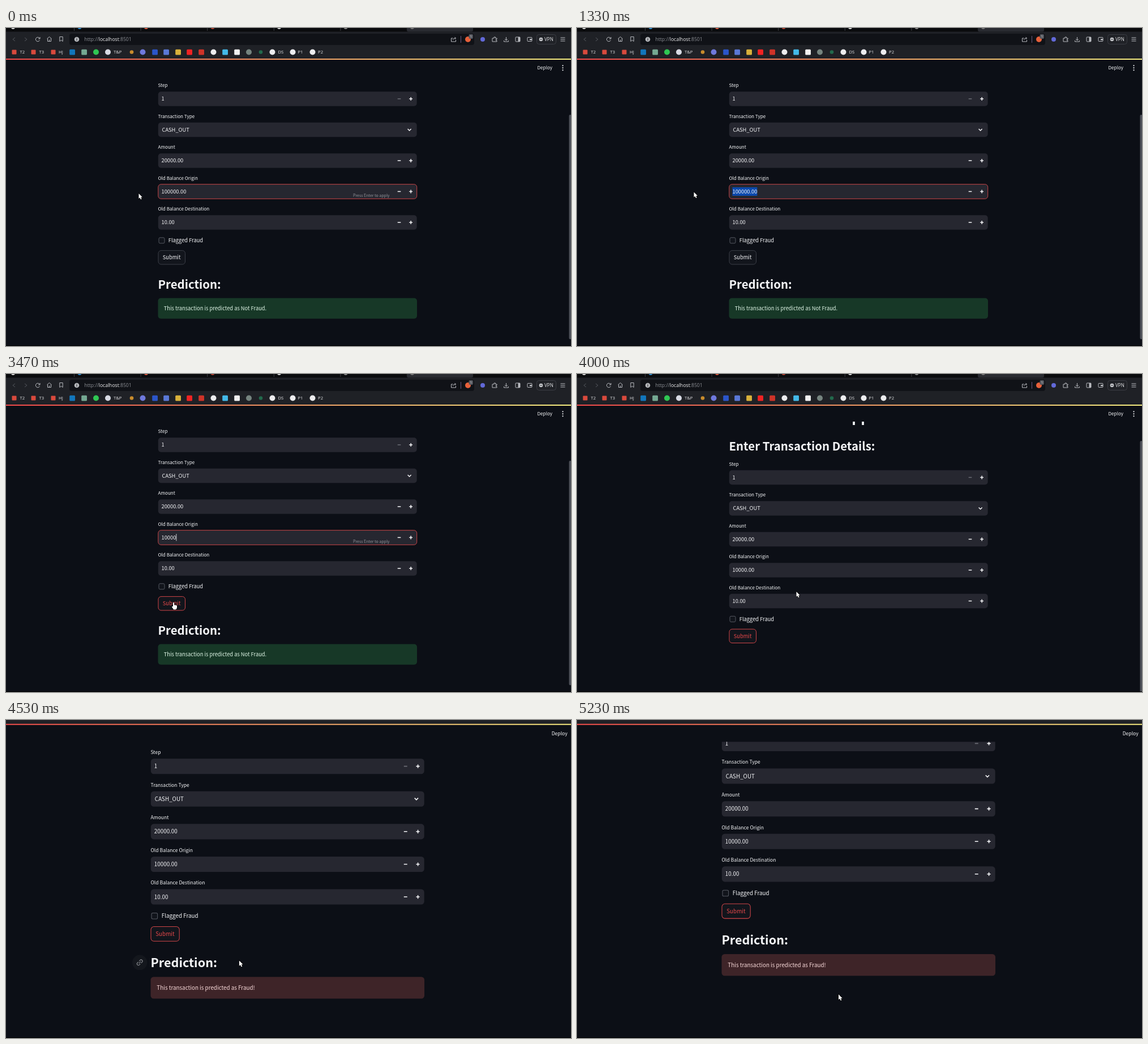
An HTML page with a canvas for the animation above (5260 ms loop, 998 px wide and 561 px high).

```html
<!DOCTYPE html>
<html lang="en">
<head>
<meta charset="utf-8">
<title>Transaction form demo</title>
<style>
  html, body { margin: 0; width: 100%; height: 100%; overflow: hidden; background: #0c0f16; }
  canvas { display: block; }
</style>
</head>
<body>
<canvas id="stage" width="998" height="561"></canvas>
<script>
const ctx = document.getElementById('stage').getContext('2d');
const LOOP = 5260, COMMIT = 3560, RESULT = 4220;
const PAGE_FONT = '"Noto Sans CJK JP","Noto Sans CJK SC","Noto Sans CJK","Open Sans",sans-serif';
const UI_FONT = '"Open Sans","Noto Sans",sans-serif';
const BG = '#0c0f16', FIELD = '#262730', WHITE = '#f6f7f9', RED = '#e8484a', BAR = '#1f2126', ICON = '#b9bbc0';
const LABEL = 8.14, BODY = 9.3, HEADING = 20.4;
const LEFT = 268.5, WIDTH = 457.5;

const clamp = v => Math.min(1, Math.max(0, v));
const smooth = v => v * v * (3 - 2 * v);

// Cursor path: time, x, y
const PATH = [
  [0, 234.5, 292], [200, 234.5, 292], [900, 206.5, 289.5], [2950, 206.5, 289.5],
  [3450, 296, 403], [3650, 296, 403], [4000, 387.5, 384], [4200, 308.7, 458.3],
  [4360, 308.7, 458.3], [4600, 443.5, 446.9], [5150, 463.9, 505.5], [LOOP, 463.9, 505.5]
];
// Time at which each typed digit of 10000 appears
const KEYS = [2200, 2350, 2480, 2620, 2850];

const ARROW = new Path2D('M0 0V9l2-1.8 1.5 3.3 1.6-.7L3.7 6.600H6.400Z');
const HAND = new Path2D('M-1 7V1a1 1 0 0 1 2 0V4.500q3.500 0 5 1.200V9q-.2 3-2 3.500H0L-3 8q-.2-1.500 2-1Z');

function cursorAt(t) {
  const i = Math.max(1, PATH.findIndex(p => p[0] > t));
  const [a, b] = [PATH[i - 1], PATH[i]];
  const p = smooth((t - a[0]) / (b[0] - a[0]));
  return [a[1] + (b[1] - a[1]) * p, a[2] + (b[2] - a[2]) * p];
}

// Text whose capitals are centred vertically on y
function text(str, x, y, size, color = WHITE, { font = PAGE_FONT, weight = 400, align = 'left' } = {}) {
  ctx.font = `${weight} ${size}px ${font}`;
  ctx.textAlign = align;
  ctx.fillStyle = color;
  ctx.fillText(str, x, y + size * .365);
}
const uiText = (str, x, y, size, color = '#e3e4e6') => text(str, x, y, size, color, { font: UI_FONT });

function rect(x, y, w, h, fill, r = 0, stroke) {
  ctx.beginPath();
  ctx.roundRect(x, y, w, h, r);
  if (fill) { ctx.fillStyle = fill; ctx.fill(); }
  if (stroke) { ctx.strokeStyle = stroke; ctx.lineWidth = 1; ctx.stroke(); }
}

function dot(x, y, r, color) {
  ctx.beginPath();
  ctx.arc(x, y, r, 0, 7);
  ctx.fillStyle = color;
  ctx.fill();
}

function line(d, x, y, color = ICON, width = 1) {
  ctx.save();
  ctx.translate(x, y);
  ctx.strokeStyle = color;
  ctx.lineWidth = width;
  ctx.stroke(new Path2D(d));
  ctx.restore();
}

function browser() {
  rect(-20, -2, 1040, 56, BAR);
  rect(-20, -2, 1040, 8.5, '#0a0b0d');
  rect(708, -5, 117, 11.5, '#292b31', 3);
  for (let i = 0; i < 7; i++) {
    dot(12.500 + i * 117.500, -1.500, 3.500, ['#ddd', '#2c8fd6', '#e2583e', '#b8402f', '#ddd', '#888', '#777'][i]);
    if (i < 5) rect(120 + i * 117.600, 0, 1, 5, '#3c3e44');
  }

  line('M3-3L-1 0L3 3', 13, 20, '#53565c');
  line('M-3-3L1 0L-3 3', 36, 20, '#53565c');
  line('M3.500-1.500A3.700 3.700 0 1 0 3.500 1.500M4-4V-1H1', 56, 20);
  line('M-4-.5L0-4L4-.5M-3-1V4H3V-1M0 4V1', 76.500, 19.500);
  line('M-2.700-4H2.700V4L0 2L-2.700 4Z', 97.500, 19.500);
  rect(112, 10, 715, 20, '#101217', 4);
  dot(125, 20, 4.300, '#b5b7bb');
  rect(124.500, 19.300, 1, 3, '#101217');
  rect(124.500, 17.400, 1, 1, '#101217');
  uiText('http://', 138.500, 20, 8.600, '#8d9096');
  const schemeWidth = ctx.measureText('http://').width;
  uiText('localhost', 138.500 + schemeWidth, 20, 8.600, '#f0f0f1');
  const hostWidth = ctx.measureText('localhost').width;
  uiText(':8501', 138.500 + schemeWidth + hostWidth, 20, 8.600, '#8d9096');
  line('M-1-2H-4V4H4V1M-1 1Q-1-2 4-2M2-4L4-2L2 0', 790.500, 20);
  rect(803, 14, 1, 12, '#67587e');
  dot(816, 20, 5, '#e7603a');
  rect(817.500, 11, 7.500, 8, '#55585f', 2);
  uiText('1', 819.500, 15, 6);
  dot(842, 20, 4, '#6269d8');
  line('M-4-2H-1V-4H1.500V-2H4V0H2.500V2H4V4H-4Z', 863, 20);
  line('M0-4V2M-2.500-.5L0 2L2.500-.5M-4 2V4H4V2', 883.500, 20);
  rect(900, 16, 8, 8, null, 1, ICON);
  rect(904.500, 16, 3.500, 8, ICON);
  rect(921, 16.500, 8, 7, null, 1, ICON);
  rect(925, 19, 4, 2.500, ICON);
  rect(937.500, 11.500, 34, 17, '#202227', 4, '#3b3d44');
  dot(945, 20, 3.300, '#c9cbcf');
  rect(943.200, 19.500, 3.600, 1, BAR);
  uiText('VPN', 951, 20, 8.100);
  line('M-4-3H4M0 0H0M-4 0H4M-4 3H4', 983.500, 20);

  for (const x of [14.500, 48.500, 83.500]) rect(x - 4, 38.500, 8, 8, '#d94a3d', 1);
  const squares = { 117: '#1276bb', 138: '#74a892', 263: '#2b55c8', 283: '#5a78d6', 304: '#d9b13a',
                    324: '#f02323', 345: '#cf3328', 387: '#43b9e8', 408: '#f1f1f1' };
  for (const x in squares) rect(x - 4.800, 37.700, 9.800, 9.800, squares[x], 1.500);
  const circles = { 159: '#2fc653', 180: '#d8dbe4', 222: '#c98c2c', 241.500: '#6f79dc', 366.500: '#ececee',
                    429: '#75847f', 450: '#226a4c', 470.500: '#ececee', 506.500: '#ececee', 541.500: '#ececee' };
  for (const x in circles) dot(+x, 42.500, +x === 222 || +x === 450 ? 3.300 : 5, circles[x]);
  const names = { 24.500: 'T2', 58.500: 'T3', 93: 'HJ', 190: 'T&P', 480.500: 'DS', 515.500: 'P1', 551: 'P2' };
  for (const x in names) uiText(names[x], +x, 42.500, 7.700);
}

function pageHeader(t) {
  const glow = ctx.createLinearGradient(0, 0, 998, 0);
  glow.addColorStop(0, '#f2494a');
  glow.addColorStop(1, '#f5ee80');
  rect(-20, 54, 1040, 2, glow);
  text('Deploy', 938.500, 70, LABEL);
  for (const y of [66.300, 70.300, 74.300]) dot(983.500, y, 1.100, WHITE);

  const busy = t < 4000 ? clamp((3900 - t) / 120) * (t > 3620) : clamp((4420 - t) / 130) * (t > RESULT);
  if (!busy) return;
  ctx.globalAlpha = busy;
  dot(834, 64.500, 1.400, '#5a5d63');
  line('M-5-3H5M0-3V2M-1.600-3V7M1.600-3V7', 834, 70, '#5a5d63', 1.600);
  text('RUNNING...', 848, 70, LABEL, '#54575e');
  text('Stop', 904.800, 70, LABEL, '#7c7f85');
  ctx.globalAlpha = 1;
}

function field(label, y, { value, focused, disabled, select } = {}) {
  text(label, LEFT, y - 23.500, LABEL);
  rect(LEFT + .3, y - 12.800, WIDTH - .6, 25.600, FIELD, 5, focused ? '#c94447' : null);
  text(value, select ? 275.500 : 274.500, y, BODY);
  if (select) return line('M-3-1.500L0 1.500L3-1.500', 712.600, y, WHITE, 1.500);
  rect(691.700, y - .8, 5.600, 1.500, disabled ? '#6c6e76' : WHITE);
  rect(712.200, y - .8, 5.800, 1.500, WHITE);
  rect(714.400, y - 2.900, 1.500, 5.800, WHITE);
}

function originField(t, y) {
  const typed = KEYS.filter(k => t >= k).length;
  const selected = t >= 1000 && !typed;
  const value = t >= COMMIT ? '10000.00' : typed ? '10000'.slice(0, typed) : '100000.00';
  const focused = t < COMMIT;
  field('Old Balance Origin', y, { value, focused });
  if (!focused) return;
  ctx.font = `400 ${BODY}px ${PAGE_FONT}`;
  const width = ctx.measureText(value).width;
  if (selected) {
    rect(274.500, y - 7.500, width, 15, '#0b49ad');
    text(value, 274.500, y, BODY);
  } else {
    text('Press Enter to apply', 677.500, y + 7, 6.970, '#92949b', { align: 'right' });
    if (typed) rect(274.700 + width, y - 6.500, .8, 12.500, WHITE);
  }
}

function prediction(t, y) {
  const fraud = t >= RESULT;
  if (t >= COMMIT && !fraud) return;
  const hover = clamp((t - 4480) / 60) * clamp((5000 - t) / 60);
  if (hover) {
    ctx.globalAlpha = hover;
    dot(250.300, y - .5, 12.500, '#16191f');
    ctx.save();
    ctx.translate(250.300, y - .5);
    ctx.rotate(-Math.PI / 4);
    line('M-1-2.300H-3.200A2.300 2.300 0 0 0-3.200 2.300H-1M1-2.300H3.200A2.300 2.300 0 0 1 3.200 2.300H1M-2.300 0H2.300', 0, 0, '#a5a7ac');
    ctx.restore();
    ctx.globalAlpha = 1;
  }
  text('Prediction:', LEFT, y, HEADING, WHITE, { weight: 600 });
  ctx.globalAlpha = fraud ? clamp((t - RESULT) / 125) : 1;
  rect(LEFT, y + 23.500, WIDTH, 36.200, fraud ? '#3e2428' : '#173827', 5);
  text(`This transaction is predicted as ${fraud ? 'Fraud!' : 'Not Fraud.'}`, 278.800, y + 41.700, BODY,
       fraud ? '#fbdcdc' : '#e2f8e9');
  ctx.globalAlpha = 1;
}

function page(t, hovering) {
  const scrolled = 95.600 * (1 - (1 - clamp((t - 4440) / 300)) ** 2.550);
  const y = (t < COMMIT ? 125 : 182.500) - scrolled;
  ctx.save();
  ctx.beginPath();
  ctx.rect(-20, 84, 1040, 600);
  ctx.clip();

  text('Fraud Detection App', LEFT, y - 107.300, 24.900, WHITE, { weight: 600 });
  text('Enter Transaction Details:', LEFT, y - 54.700, HEADING, WHITE, { weight: 600 });
  field('Step', y, { value: '1', disabled: true });
  field('Transaction Type', y + 54.500, { value: 'CASH_OUT', select: true });
  field('Amount', y + 109, { value: '20000.00' });
  originField(t, y + 163.500);
  field('Old Balance Destination', y + 218, { value: '10.00' });
  rect(270, y + 244.800, 10, 10, '#11141b', 2, '#555861');
  text('Flagged Fraud', 286.800, y + 250, BODY);
  const hot = hovering || t >= COMMIT;
  rect(269, y + 267.600, 47.500, 24.400, '#12151c', 5, hot ? '#cf4548' : '#3b3e47');
  text('Submit', 292.600, y + 280, BODY, hot ? RED : WHITE, { align: 'center' });
  prediction(t, y + 328);
  ctx.restore();

  const [top, bottom] = t < COMMIT ? [153, 549] : [118, 565];
  rect(994.500, top, 4, bottom - top, '#4d5058', 2);
}

function cursor(t, hovering) {
  const shape = hovering ? HAND : ARROW;
  ctx.save();
  ctx.translate(...cursorAt(t));
  ctx.strokeStyle = '#000';
  ctx.lineWidth = 1.200;
  ctx.stroke(shape);
  ctx.fillStyle = '#fff';
  ctx.fill(shape);
  ctx.restore();
}

function draw(now) {
  const t = now % LOOP;
  const hovering = (t > 3420 && t < COMMIT) || (t > 4170 && t < 4390);
  const zoom = smooth(clamp((t - 4040) / 220));
  const scale = 1 + .057 * zoom;
  ctx.setTransform(1, 0, 0, 1, 0, 0);
  rect(0, 0, 998, 561, BG);
  ctx.setTransform(scale, 0, 0, scale, 497 * (1 - scale), -50.400 * zoom);
  page(t, hovering);
  browser();
  pageHeader(t);
  cursor(t, hovering);
  ctx.setTransform(1, 0, 0, 1, 0, 0);
  rect(0, 560, 998, 1, '#000');
}

const start = performance.now();
(function frame() {
  draw(performance.now() - start);
  requestAnimationFrame(frame);
})();
</script>
</body>
</html>
```
